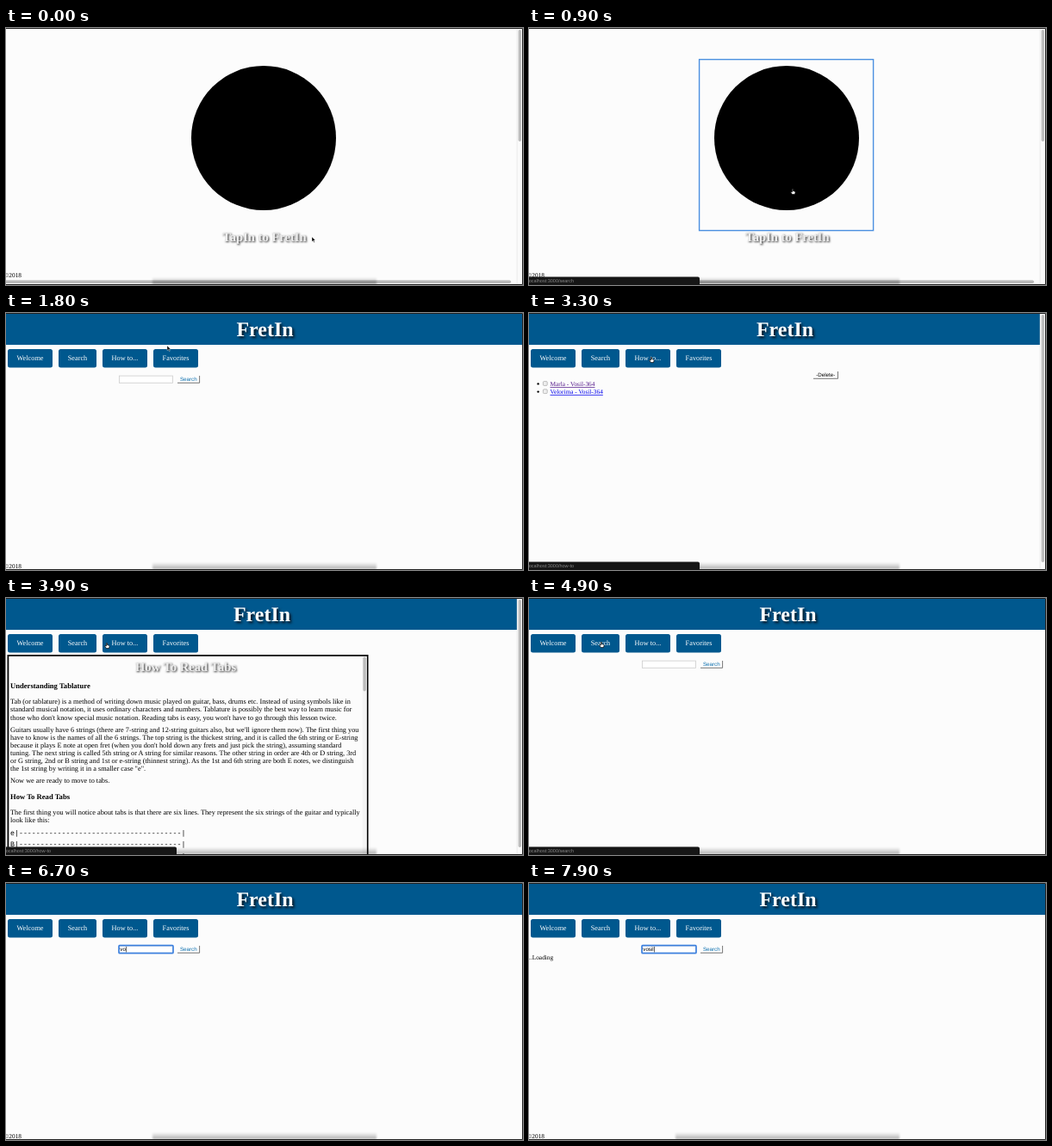
Recreate the animation shown at these times as an HTML page. Size 600 px wide and 299 px high, loop 8000 ms.

```html
<!DOCTYPE html>
<html lang="en">
<head>
<meta charset="utf-8">
<title>FretIn</title>
<style>
html, body { margin: 0; width: 100%; height: 100%; overflow: hidden; background: #fcfcfc; }
svg { display: block; width: 600px; height: 299px; }
text { font: 7.35px "Liberation Serif", serif; text-rendering: geometricPrecision; }
.mid { text-anchor: middle; }
.title { font-size: 24px; font-weight: bold; fill: #fff; filter: drop-shadow(2px 2px 1.5px #000c); }
.sub { font-size: 14.6px; font-weight: bold; fill: #eee; filter: drop-shadow(1px 1px 1px #000d); }
.nav { font-size: 8.28px; fill: #fff; }
.body { font-size: 8.28px; }
.head { font-size: 8.6px; font-weight: bold; }
.ui { font: 6.2px "Liberation Sans", sans-serif; }
.mono { font: 8.28px "Liberation Mono", monospace; }
.link { text-decoration: underline; }
#url { font: 5.5px "Liberation Sans", sans-serif; fill: #8a8a8a; }
</style>
</head>
<body>
<svg viewBox="0 0 600 299">
  <defs>
    <linearGradient id="shade" x2="0" y2="1">
      <stop offset="0" stop-opacity="0"/><stop offset="1" stop-opacity=".3"/>
    </linearGradient>
  </defs>
  <rect width="600" height="299" fill="#fcfcfc"/>
  <g id="home"></g>
  <g id="search"></g>
  <g id="favorites"></g>
  <g id="howto"></g>
  <rect x="170" y="290" width="260" height="8" fill="url(#shade)" style="filter:blur(1px)"/>
  <path d="M0 .5H599.5V298.5H0" fill="none" stroke="#222"/>
  <g id="status">
    <path d="M0 289.5H196q2 0 2 2V299H0z" fill="#161616"/>
    <text id="url" x="-1.5" y="296"></text>
  </g>
  <g id="cursor">
    <path id="arrow" d="M0 0V5.6L1.4 4.4 2.4 6.6 3.3 6.2 2.3 4.1H4z" fill="#000" stroke="#fff" stroke-width=".4"/>
    <path id="hand" d="M-.6 -2.4q.6-.8 1.1 0V-.4L2.6 .2q.7.3.5 1.1L2.5 3.6H-.5L-2.3 1q.1-.9.9-.5l.8.5z" fill="#fff" stroke="#000" stroke-width=".7"/>
    <path id="beam" d="M-1.5-3Q0-3 0-2 0-3 1.5-3M0-2V2M-1.5 3Q0 3 0 2 0 3 1.5 3M-.8 .8H.8" fill="none" stroke="#222" stroke-width=".8"/>
  </g>
</svg>
<script>
const $ = id => document.getElementById(id);
const text = (x, y, cls, s, more = '') => `<text x="${x}" y="${y}" class="${cls}" ${more}>${s}</text>`;
const rect = (x, y, w, h, fill, more = '') =>
  `<rect x="${x}" y="${y}" width="${w}" height="${h}" fill="${fill}" ${more}/>`;
const show = (id, on) => $(id).setAttribute('visibility', on ? 'visible' : 'hidden');

const BLUE = '#00588e';
const scrollbar = len => rect(593, 1, 6, 297, '#fafafa') + rect(592.8, 1, .5, 297, '#ddd')
  + rect(594.6, 2, 3.4, len, '#bdbdbd', 'rx="1.7"');
const header = width => rect(0, 1, width, 36, BLUE) + text(width / 2 + .5, 27, 'title mid', 'FretIn')
  + [[2, 52, 'Welcome'], [61, 44, 'Search'], [112, 52, 'How to...'], [171, 52, 'Favorites']]
    .map(([x, w, s]) => rect(x, 42, w, 21.5, BLUE, 'rx="2.5"') + text(x + w / 2, 55.3, 'nav mid', s)).join('');
const button = (x, y, w, s, fill) =>
  `<path d="M${x} ${y + 8.3}H${x + w}V${y}" fill="none" stroke="#555" stroke-width=".8"/>`
  + text(x + w / 2, y + 6.4, 'ui mid', s, `fill="${fill}"`);

$('home').innerHTML = '<circle cx="299" cy="128" r="84"/>'
  + text(300, 248, 'sub mid', 'TapIn to FretIn') + text(-2.3, 290, '', '©2018')
  + rect(0, 293, 593, 5, '#fafafa') + rect(-4, 293.6, 590, 3.4, '#b8b8b8', 'rx="1.7"') + scrollbar(130)
  + rect(197.6, 36.6, 202, 199, 'none', 'id="outline" stroke="#4a8fe0" stroke-width="1.4"');

$('search').innerHTML = header(600)
  + rect(131.4, 73.1, 62, 8.2, '#fff', 'stroke="#ccc" stroke-width=".8"')
  + rect(131, 72.7, 63, 9, 'none', 'id="focus" rx="1" stroke="#3f82df" stroke-width="1.7"')
  + text(132.3, 79.3, 'ui', '', 'id="typed"') + rect(0, 74, .6, 6.5, '#000', 'id="caret"')
  + button(199, 73, 25.6, 'Search', '#0b6fae')
  + text(-1.8, 89, '', '...Loading', 'id="loading"') + text(-2.3, 297, '', '©2018');

$('favorites').innerHTML = header(593) + scrollbar(288) + button(330, 68, 28.5, '-Delete-', '#000')
  + [['Marla', '#551a8b'], ['Velorima', '#0000ee']].map(([song, color], i) => {
    const y = 85 + i * 9.2;
    return `<circle cx="10.6" cy="${y - 2.6}" r="1.2"/>`
      + rect(16.4, y - 5.4, 4.8, 4.8, '#eee', 'rx="1" stroke="#999" stroke-width=".6"')
      + text(24.5, y, 'link', song + ' - Vosil-364', `fill="${color}"`);
  }).join('');

const lines = (y, ...rows) => rows.map((s, i) => text(5, y + i * 9.15, 'body', s)).join('');
$('howto').innerHTML = header(593) + scrollbar(288)
  + rect(2.4, 66.9, 417.2, 240, '#fcfcfc', 'stroke="#000" stroke-width="1.8"')
  + rect(413.6, 68, 5, 231, '#f4f4f4') + rect(414.4, 68.5, 3.4, 40, '#bbb', 'rx="1.7"')
  + text(208.5, 85, 'sub mid', 'How To Read Tabs')
  + text(5, 105, 'head', 'Understanding Tablature')
  + lines(123.2,
    'Tab (or tablature) is a method of writing down music played on guitar, bass, drums etc. Instead of using symbols like in',
    'standard musical notation, it uses ordinary characters and numbers. Tablature is possibly the best way to learn music for',
    "those who don't know special music notation. Reading tabs is easy, you won't have to go through this lesson twice.")
  + lines(155.7,
    "Guitars usually have 6 strings (there are 7-string and 12-string guitars also, but we'll ignore them now). The first thing you",
    'have to know is the names of all the 6 strings. The top string is the thickest string, and it is called the 6th string or E-string',
    "because it plays E note at open fret (when you don't hold down any frets and just pick the string), assuming standard",
    'tuning. The next string is called 5th string or A string for similar reasons. The other string in order are 4th or D string, 3rd',
    'or G string, 2nd or B string and 1st or e-string (thinnest string). As the 1st and 6th string are both E notes, we distinguish',
    'the 1st string by writing it in a smaller case "e".')
  + lines(215, 'Now we are ready to move to tabs.')
  + text(5, 234, 'head', 'How To Read Tabs')
  + lines(252.3,
    'The first thing you will notice about tabs is that there are six lines. They represent the six strings of the guitar and typically',
    'look like this:')
  + [...'eBG'].map((s, i) => text(5, 275.5 + i * 13.5, 'mono', `${s}|${'-'.repeat(38)}|`)).join('');

// Cursor stops: time, x, y
const path = [[0, 355, 243], [300, 306, 190], [1100, 306, 190], [1800, 187, 38], [2100, 196, 53], [2600, 196, 53],
  [3100, 142, 54], [3700, 142, 54], [3900, 117, 55], [4100, 84, 54], [5400, 84, 54], [5700, 147, 79]];
// Link previews: fade-in start, fade-out start, address
const links = [[400, 1100, 'search'], [2100, 2700, 'favorites'], [3000, 4000, 'how-to'], [4200, 5500, 'search']];
const pages = [[0, 'home'], [1000, 'search'], [2400, 'favorites'], [3400, 'howto'], [4700, 'search']];
const keys = [6500, 6700, 6800, 7000, 7100];
const clamp = v => Math.max(0, Math.min(1, v));

function cursorAt(t) {
  const i = path.findIndex(p => p[0] > t);
  if (i < 0) return path[path.length - 1].slice(1);
  const [t0, x0, y0] = path[i - 1], [t1, x1, y1] = path[i], k = (t - t0) / (t1 - t0);
  return [x0 + (x1 - x0) * k, y0 + (y1 - y0) * k];
}

function draw(t) {
  const page = pages.filter(p => p[0] <= t).pop()[1];
  for (const id of ['home', 'search', 'favorites', 'howto']) $(id).style.display = id === page ? '' : 'none';
  show('outline', t >= 900);

  const n = keys.filter(k => k <= t).length, focused = t >= 6200;
  $('typed').textContent = 'vosil'.slice(0, n);
  $('caret').setAttribute('x', 132.6 + (n ? $('typed').getComputedTextLength() : 0));
  show('focus', focused);
  show('caret', focused);
  show('loading', t >= 7400);

  const link = links.filter(l => l[0] <= t).pop();
  $('status').style.opacity = link ? clamp((t - link[0]) / 200) * clamp(1 - (t - link[1]) / 400) : 0;
  if (link) $('url').textContent = 'localhost:3000/' + link[2];

  const [x, y] = cursorAt(t);
  $('cursor').setAttribute('transform', `translate(${x} ${y})`);
  const overNav = y > 42 && y < 63.5 && page !== 'home';
  const hand = overNav || page === 'home' && y < 235;
  const beam = page === 'search' && y > 70 && t > 5400;
  show('hand', hand);
  show('beam', beam && n === 0);
  show('arrow', !hand && !beam);
}

function frame(now) {
  draw(Math.floor(now % 8000 / 100) * 100);
  requestAnimationFrame(frame);
}
draw(0);
requestAnimationFrame(frame);
</script>
</body>
</html>
```
